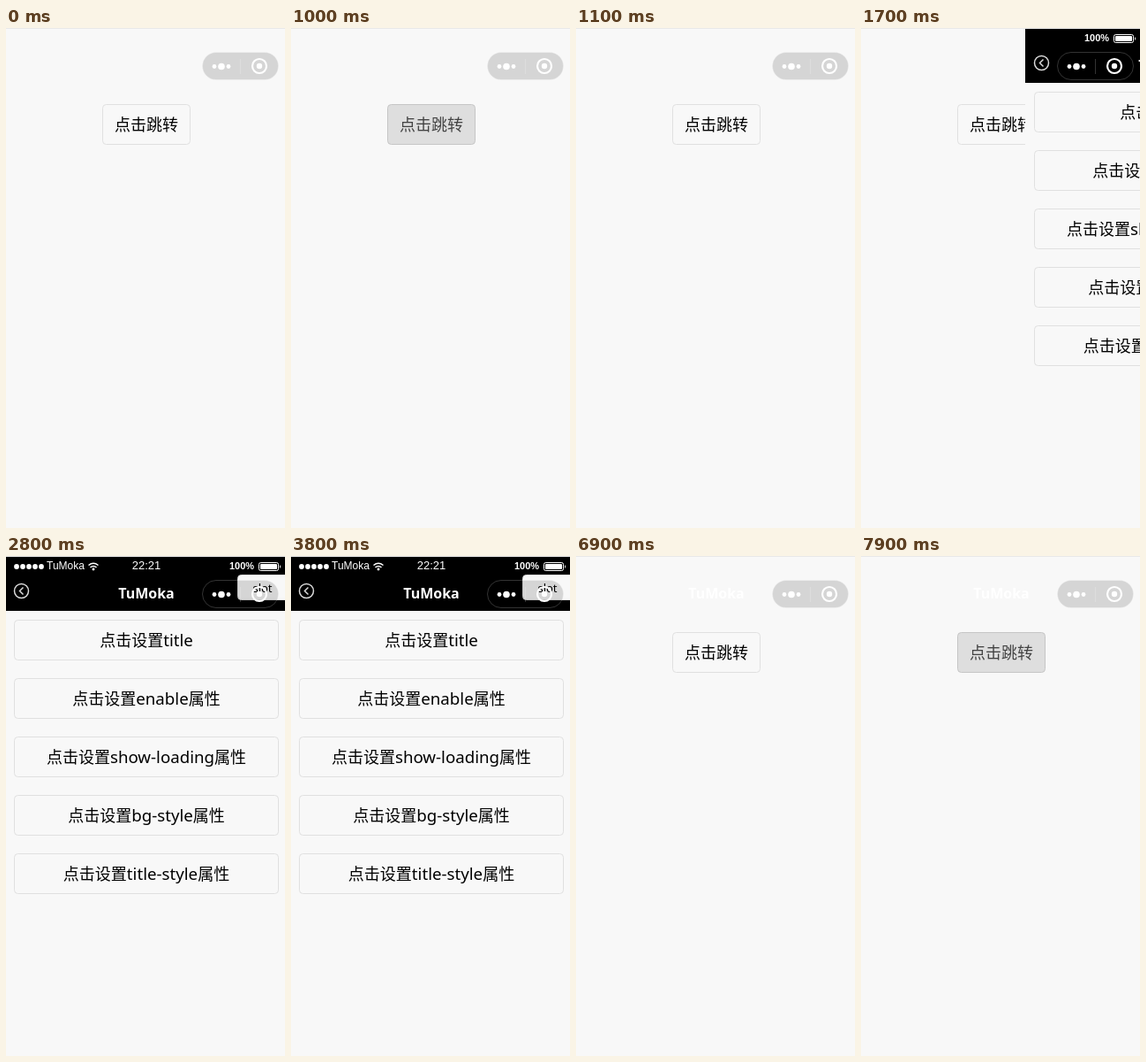
An HTML page for the animation above (8 s loop, 316x565 px).

```html
<!DOCTYPE html>
<html lang="zh-CN">
<head>
<meta charset="utf-8">
<style>
html, body { margin: 0; width: 100%; height: 100%; overflow: hidden; background: #f8f8f8; }
svg { display: block; }
text { text-anchor: middle; font: 18px "Noto Sans", "Noto Sans CJK SC", "Noto Sans CJK", sans-serif; }
.latin { font-size: 18.7px; }
.box { fill: #f8f8f8; stroke: #e0e0e0; }
.title { font-size: 16px; font-weight: 700; fill: #fff; }
.bar text { font: 13px "Liberation Sans", Arial, sans-serif; fill: #fff; }
.bar .name { font-size: 12px; text-anchor: start; }
.bar .level { font-size: 11px; font-weight: 700; text-anchor: start; }
.line { fill: none; stroke: #fff; }
.pressed .box { fill: #dedede; stroke: #c6c6c6; }
.pressed text { fill: #000; fill-opacity: .7; }
</style>
</head>
<body>
<svg width="316" height="565" viewBox="0 0 316 565">
  <rect width="316" height="565" fill="#f8f8f8"/>

  <g id="jump">
    <rect class="box" x="109.5" y="86.5" width="99" height="45" rx="4"/>
    <text x="159" y="116">点击跳转</text>
  </g>
  <text id="ghost" class="title" x="159" y="48">TuMoka</text>

  <g id="page">
    <rect x="-1" width="318" height="565" fill="#f8f8f8"/>
    <rect x="-1" width="318" height="62"/>
    <g class="line" stroke-width="1.5" opacity=".85">
      <circle cx="17.5" cy="39.5" r="8"/>
      <path d="M19.5 35.5l-4 4 4 4"/>
    </g>
    <text class="title" x="159" y="48">TuMoka</text>
    <g id="rows"></g>
    <rect class="box" x="262.5" y="21.5" width="58" height="28" rx="4"/>
    <text x="290.5" y="41" style="font-size:13px">slot</text>
  </g>

  <g id="signal" class="bar">
    <g id="dots" fill="#fff"></g>
    <text class="name" x="46" y="15">TuMoka</text>
    <g class="line" stroke-width="1.5">
      <path d="M93.5 10.5q5.5-4.5 11 0M95.5 12.8q3.5-2.8 7 0"/>
      <circle cx="99" cy="15" r=".7"/>
    </g>
    <text x="159" y="15">22:21</text>
  </g>
  <g id="power" class="bar">
    <text class="level" x="253" y="15">100%</text>
    <rect class="line" x="286.5" y="7.5" width="22" height="9" rx="2"/>
    <rect x="288" y="9" width="19" height="6" rx="1" fill="#fff"/>
    <path d="M310 10q2 2 0 4z" fill="#fff"/>
  </g>

  <g fill="#fff">
    <rect x="222.5" y="27.5" width="86" height="31" rx="15.5" fill="#000" fill-opacity=".14" stroke="#fff" stroke-opacity=".2"/>
    <path d="M265.5 35v17" stroke="#fff" stroke-opacity=".2"/>
    <circle cx="236" cy="43.5" r="2.4"/>
    <circle cx="244" cy="43.5" r="3.8"/>
    <circle cx="252" cy="43.5" r="2.4"/>
    <circle class="line" cx="287" cy="43" r="8" stroke-width="2.2"/>
    <circle cx="287" cy="43" r="3.2"/>
  </g>
  <rect width="316" height="1" fill="#e8e8e8"/>
</svg>
<script>
const $ = id => document.getElementById(id);
const show = (id, on) => $(id).style.display = on ? "" : "none";

$("rows").innerHTML = ["title", "enable属性", "show-loading属性", "bg-style属性", "title-style属性"]
  .map((label, i) => {
    const y = 72 + 66 * i;
    const text = label.replace(/[a-z-]+/, '<tspan class="latin">$&</tspan>');
    return `<rect class="box" x="9.5" y="${y + .5}" width="299" height="45" rx="4"/>
      <text x="159" y="${y + 30}">点击设置${text}</text>`;
  }).join("");
$("dots").innerHTML = [0, 1, 2, 3, 4]
  .map(i => `<circle cx="${12 + 7 * i}" cy="12" r="2.9"/>`).join("");

const LOOP = 8000;
let start;

function draw(now) {
  start ??= now;
  const t = (now - start) % LOOP;
  const open = t >= 1700 && t < 6900;
  const settled = open && t >= 1800;
  $("jump").setAttribute("class", (t >= 1000 && t < 1100) || t >= 7900 ? "pressed" : "");
  $("page").setAttribute("transform", `translate(${settled ? 0 : 187})`);
  show("page", open);
  show("power", open);
  show("signal", settled);
  show("ghost", t >= 6900);
  requestAnimationFrame(draw);
}
requestAnimationFrame(draw);
</script>
</body>
</html>
```
